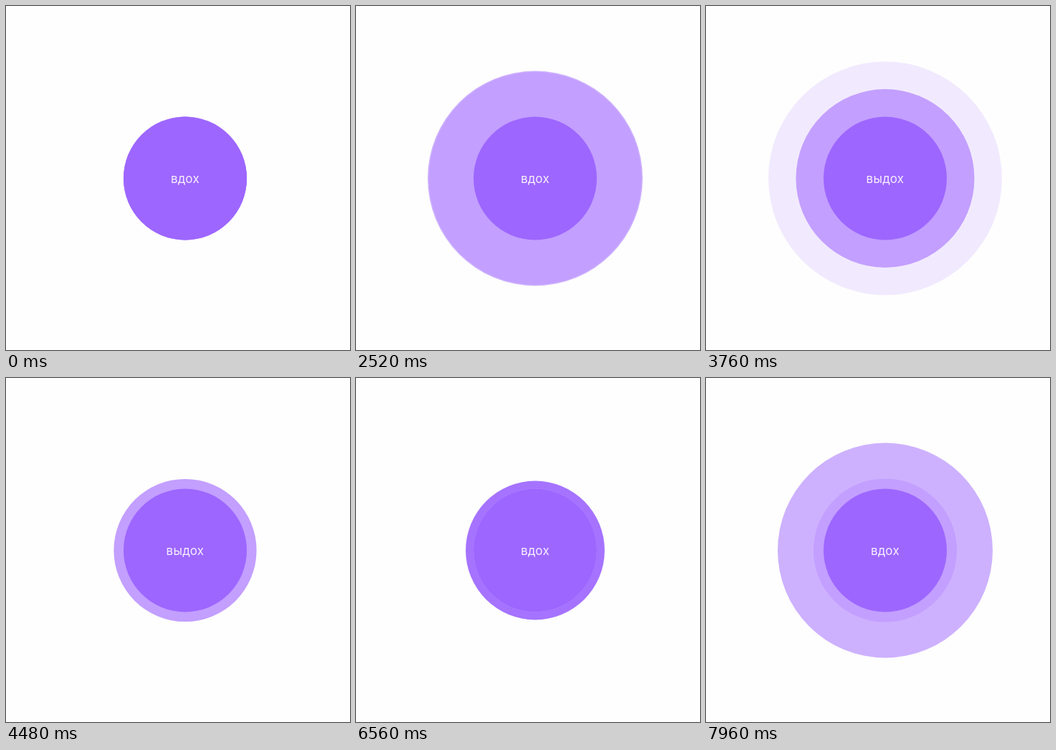
Write an HTML page that moves like this. It is 480 px wide and 480 px high and loops after 8 s.

```html
<!DOCTYPE html>
<html lang="ru">
<head>
<meta charset="utf-8">
<title>Дыхание</title>
<style>
  html, body { margin: 0; width: 100%; height: 100%; overflow: hidden; background: #fefefe; }
  svg { display: block; width: 100%; height: 100%; }
  text { font: 400 17px Inter, "Open Sans", sans-serif; letter-spacing: .3px; text-anchor: middle; fill: #f6efff; }
</style>
</head>
<body>
<svg viewBox="0 0 480 480">
  <g transform="translate(250 240.5)">
    <circle id="outer" r="86" fill="#9d66ff"/>
    <circle id="middle" r="86" fill="#c39fff"/>
    <circle r="86" fill="#9d66ff"/>
    <text id="inhale" y="6">вдох</text>
    <text id="exhale" y="6" opacity="0">выдох</text>
  </g>
</svg>
<script>
  const LOOP = 8000, BREATH = 6000;
  const REST = 86, MID = 150, FAR = 214;
  const [outer, middle, inhale, exhale] =
    ["outer", "middle", "inhale", "exhale"].map(id => document.getElementById(id));

  const clamp = v => Math.min(1, Math.max(0, v));
  const mix = (a, b, p) => a + (b - a) * p;

  function bezier(x1, y1, x2, y2) {
    const curve = (a, b, s) => 3 * a * s * (1 - s) ** 2 + 3 * b * s * s * (1 - s) + s ** 3;
    return x => {
      if (x <= 0 || x >= 1) return clamp(x);
      let low = 0, high = 1;
      for (let i = 0; i < 24; i++) {
        const s = (low + high) / 2;
        if (curve(x1, x2, s) < x) low = s; else high = s;
      }
      return curve(y1, y2, low);
    };
  }
  const easeIn = bezier(.42, 0, 1, 1);
  const ease = bezier(.25, .1, .25, 1);
  const span = (t, start, length) => clamp((t - start) / length);

  function draw(time) {
    // the exhale settles shortly after the nominal end of a breath
    const t = time < BREATH + 30 ? time : time - BREATH;
    const first = easeIn(span(t, 35, 1500));
    const second = easeIn(span(t, 1570, 965));
    const third = easeIn(span(t, 2535, 490));
    const out = ease(span(t, 3025, 3000));

    const reach = mix(mix(REST, MID, first), FAR, third * (first === 1));
    outer.setAttribute("r", mix(reach, REST, out));
    outer.setAttribute("opacity", mix(mix(1, .5, first), .27, third) * clamp(1 - 1.3 * out));
    middle.setAttribute("r", mix(mix(REST, MID, second), REST, out));

    const swap = span(time, 3290, 300) - span(time, BREATH + 200, 300);
    inhale.setAttribute("opacity", 1 - swap);
    exhale.setAttribute("opacity", swap);
  }

  const begin = performance.now();
  function tick() {
    draw((performance.now() - begin) % LOOP);
    requestAnimationFrame(tick);
  }
  tick();
</script>
</body>
</html>
```
